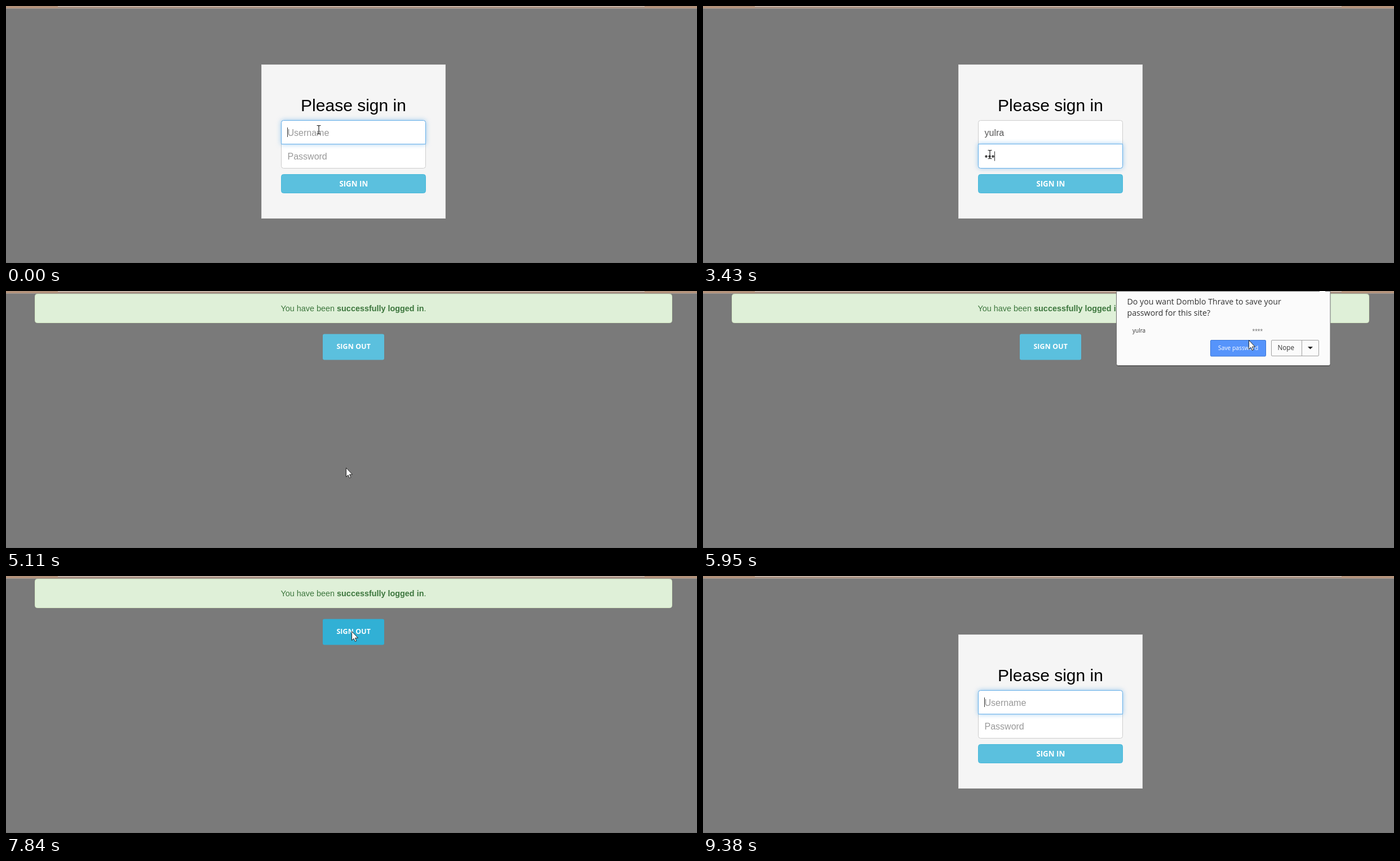
Write an HTML page that moves like this. It is 1226 by 457 pixels and loops after 9660 ms.

```html
<!DOCTYPE html>
<html lang="en">
<head>
<meta charset="utf-8">
<title>Sign in and out</title>
<style>
  html, body { margin: 0; width: 100%; height: 100%; overflow: hidden; background: #7a7a7a; }
  svg { display: block; width: 1226px; height: 457px; }
  text { font-family: "Liberation Sans", Arial, sans-serif; font-size: 16px; }
  .mid { text-anchor: middle; }
  .hint { fill: #999; }
  .typed { fill: #555; }
  .open, .open text { font-family: "Open Sans", sans-serif; }
  .label { font-weight: 700; fill: #fff; text-anchor: middle; }
  .glow { filter: drop-shadow(0 0 4px rgba(102, 175, 233, .65)); }
</style>
</head>
<body>
<svg viewBox="0 0 1226 457">
  <rect width="1226" height="457" fill="#7a7a7a"/>
  <rect width="1226" height="4" fill="#b3937c"/>
  <rect x="92" width="1041" height="4" fill="#ab9384"/>
  <rect x="92" width="1041" height="1" fill="#e0d2c6"/>
  <rect y="4" width="1226" height="1" fill="#9b9794"/>
  <rect y="456" width="1226" height="1" fill="#727272"/>

  <g id="login">
    <rect id="card" x="453.5" y="104.5" width="326" height="273" fill="#f5f5f5" stroke="#e3e3e3"/>
    <text class="mid" x="616.5" y="187" style="font-size:30px">Please sign in</text>
    <path d="M488.5 245.5V207.5a4 4 0 0 1 4-4H740.5a4 4 0 0 1 4 4V245.5Z" fill="#fff" stroke="#ccc"/>
    <path d="M488.5 245.5V284.5a4 4 0 0 0 4 4H740.5a4 4 0 0 0 4-4V245.5Z" fill="#fff" stroke="#ccc"/>
    <path id="userGlow" class="glow" d="M488.5 245.5V207.5a4 4 0 0 1 4-4H740.5a4 4 0 0 1 4 4V245.5Z" fill="#fff" stroke="#66afe9"/>
    <path id="passGlow" class="glow" d="M488.5 245.5V284.5a4 4 0 0 0 4 4H740.5a4 4 0 0 0 4-4V245.5Z" fill="#fff" stroke="#66afe9"/>
    <text id="userHint" class="hint" x="499.5" y="231">Username</text>
    <text id="user" class="typed" x="499.5" y="231"></text>
    <text id="passHint" class="hint" x="499.5" y="273">Password</text>
    <g id="dots" fill="#444"></g>
    <rect id="caret" width="1" height="17" fill="#333"/>
    <rect id="ring" x="487.5" y="298.5" width="258" height="35" rx="4" fill="none" stroke="#7fb2ea" stroke-width="1.5"/>
    <rect id="signIn" x="488.5" y="299.5" width="256" height="33" rx="4"/>
    <text class="label open" x="616.8" y="321" style="font-size:13.3px">SIGN IN</text>
    <g id="spinner"></g>
  </g>

  <g id="home">
    <rect x="51.5" y="5.5" width="1130" height="51" rx="4" fill="#dff0d8" stroke="#d6e9c6"/>
    <text class="mid" x="616.5" y="36" fill="#3c763d" style="font-size:14.4px">You have been <tspan font-weight="700">successfully logged in</tspan>.</text>
    <rect id="signOut" x="562" y="76.5" width="109" height="46" rx="3"/>
    <text class="label open" x="616.8" y="103.3" style="font-size:12.4px;letter-spacing:.15px">SIGN OUT</text>
  </g>

  <g id="popup" class="open">
    <path d="M734 0V131q0 3 3 3H1110q3 0 3-3V0Z" fill="#000" opacity=".3"/>
    <path d="M733.5 0.5V129.5a3 3 0 0 0 3 3H1110a3 3 0 0 0 3-3V0.5Z" fill="#fbfbfb" stroke="#6d6d6d"/>
    <rect x="1094" width="10" height="1.5" fill="#fff"/>
    <g fill="#333">
      <text x="752.5" y="23.5" style="font-size:14.2px">Do you want Domblo Thrave to save your</text>
      <text x="752.5" y="43.5" style="font-size:14.2px">password for this site?</text>
      <text x="762" y="74" style="font-size:10px">yulra</text>
    </g>
    <text x="974.5" y="76" fill="#777" style="font:12px 'Liberation Sans',sans-serif">****</text>
    <rect x="900.5" y="87.5" width="98" height="28.5" rx="1.5" fill="#5694fb" stroke="#3b77d6"/>
    <text x="914" y="105" fill="#fff" style="font-size:10.3px">Save password</text>
    <rect id="nope" x="1008.5" y="87.5" width="84" height="28" rx="1.5" stroke="#a0a0a0"/>
    <path d="M1062.5 88V115" stroke="#a0a0a0"/>
    <text x="1019.5" y="105" fill="#333" style="font-size:11.7px">Nope</text>
    <path d="M1073 99H1082L1077.5 103.5Z" fill="#222"/>
  </g>

  <g id="beam" fill="none">
    <path d="M-3.5-7.5H-1L0-6.5 1-7.5H3.5M0-6.5V6.5M-3.5 7.5H-1L0 6.5 1 7.5H3.5" stroke="#222" stroke-width="1.2"/>
  </g>
  <g id="hand" fill="#fff" stroke="#222" stroke-linejoin="round">
    <path d="M-2 1Q-2-1 0-1T2 1V6.3Q4 5.4 5 7 7 6.2 8 8 11 7.4 11 10V14Q11 16 9.5 18V20H-.5V18Q-4 14-6 11.4-6.6 9.4-5 9.2-3.4 9.2-2 11.2Z"/>
    <path d="M2 6.5V10M5 7V10.5M8 8V11" fill="none"/>
  </g>
  <path id="arrow" d="M.5.5V16.5L4 13.2 6.4 18.5 8.8 17.5 6.5 12.2H11.5Z" fill="#fff" stroke="#222" stroke-linejoin="round"/>
</svg>

<script>
const LOOP = 9660, STEP = 70;
const NAME = "yulra";
const NAME_KEYS = [560, 840, 1190, 1400, 1610];
const PASS_KEYS = [2940, 3150, 3430, 3710];
const HOME_AT = 5110, RETURN_AT = 8050;

// Pointer stops: time, x, y
const PATH = [
  [0, 555, 220], [1890, 555, 220], [2170, 509, 264],
  [3990, 509, 264], [4340, 603, 314],
  [5460, 603, 314], [5740, 842, 98], [5880, 842, 98], [5950, 968, 87],
  [6090, 1030, 96], [6370, 1033, 97], [6720, 712, 109],
  [6860, 712, 109], [7070, 613, 98],
  [8400, 613, 98], [8820, 1040, 363],
  [8960, 1040, 363], [9170, 1215, 454]
];

const $ = id => document.getElementById(id);
const set = (id, attrs) => {
  for (const k in attrs) $(id).setAttribute(k, attrs[k]);
};
const show = (id, on) => set(id, { visibility: on ? "visible" : "hidden" });
const ramp = (t, a, b) => Math.min(1, Math.max(0, (t - a) / (b - a)));
const within = (t, a, b) => t >= a && t < b;
const count = (keys, t) => keys.filter(k => t >= k).length;

function add(parent, tag, attrs) {
  const el = document.createElementNS("http://www.w3.org/2000/svg", tag);
  for (const k in attrs) el.setAttribute(k, attrs[k]);
  return $(parent).appendChild(el);
}

const dots = PASS_KEYS.map((_, i) =>
  add("dots", "circle", { cx: 502.5 + 6 * i, cy: 267.5, r: 2.2 }));
const spokes = Array.from({ length: 12 }, (_, i) =>
  add("spinner", "path", {
    d: "M0-4.2V-7.4", stroke: "#222", "stroke-width": 1.6,
    transform: `translate(616 344) rotate(${i * 30})`
  }));

function pointerAt(t) {
  const next = PATH.findIndex(p => p[0] > t);
  if (next < 0) return PATH[PATH.length - 1].slice(1);
  const [a, b] = [PATH[next - 1], PATH[next]];
  const f = ramp(t, a[0], b[0]);
  return [a[1] + (b[1] - a[1]) * f, a[2] + (b[2] - a[2]) * f];
}

function drawLogin(t, again) {
  const letters = again ? 0 : count(NAME_KEYS, t);
  const stars = again ? 0 : count(PASS_KEYS, t);
  $("user").textContent = NAME.slice(0, letters);
  $("userHint").style.display = letters ? "none" : "";
  $("passHint").style.display = stars ? "none" : "";
  dots.forEach((d, i) => { d.style.display = i < stars ? "" : "none"; });

  set("userGlow", { opacity: again ? ramp(t, 8120, 8330) : 1 - ramp(t, 2310, 2450) });
  set("passGlow", { opacity: again ? 0 : ramp(t, 2310, 2450) * (1 - ramp(t, 4410, 4550)) });

  const inPass = within(t, 2380, 4480);
  const lit = t < 350 || within(t, 560, 2100) || within(t, 2380, 4200)
    || within(t, 8190, 8680) || t >= 9100;
  $("caret").style.display = lit ? "" : "none";
  const x = inPass ? 499 + 6 * stars
    : Math.round(499 + (letters ? $("user").getComputedTextLength() + .3 : 0));
  set("caret", { x, y: inPass ? 258.5 : 216 });

  const hover = !again && t >= 4270, sent = !again && t >= 4620;
  set("signIn", hover ? { fill: "#31b0d5", stroke: "#35a3d3" } : { fill: "#5bc0de", stroke: "#46b8da" });
  $("ring").style.display = !again && t >= 4480 ? "" : "none";
  set("card", { height: sent ? 303 : 273 });
  $("spinner").style.display = sent ? "" : "none";
  const head = t < 4690 ? 11 : t < 4970 ? 0 : 1 + (t - 4970) / STEP;
  spokes.forEach((s, i) => set2(s, .12 + .88 * (1 - ((head - i + 24) % 12) / 12) ** 1.4));
}

function set2(el, opacity) {
  el.setAttribute("opacity", opacity);
}

function draw(t) {
  const home = within(t, HOME_AT, RETURN_AT);
  $("login").style.display = home ? "none" : "";
  $("home").style.display = home ? "" : "none";
  if (!home) drawLogin(t, t >= RETURN_AT);

  const pressed = within(t, 7770, 7840);
  set("signOut", { fill: pressed ? "#2ca6ca" : t >= 7000 ? "#31b0d5" : "#5bc0de" });
  show("popup", within(t, 5250, 6440));
  set("nope", { fill: within(t, 6300, 6440) ? "#e2e2e2" : "#fbfbfb" });

  const [x, y] = pointerAt(t).map(Math.round);
  const kind = t < 4200 ? "beam" : within(t, 4270, HOME_AT) ? "hand" : "arrow";
  for (const id of ["beam", "hand", "arrow"]) {
    show(id, id === kind && t < 9310);
    set(id, { transform: `translate(${x} ${y})` });
  }
}

const start = performance.now();
function tick(now) {
  const t = Math.max(0, now - start) % LOOP;
  draw(Math.floor(t / STEP) * STEP);
  requestAnimationFrame(tick);
}
draw(0);
requestAnimationFrame(tick);
</script>
</body>
</html>
```
